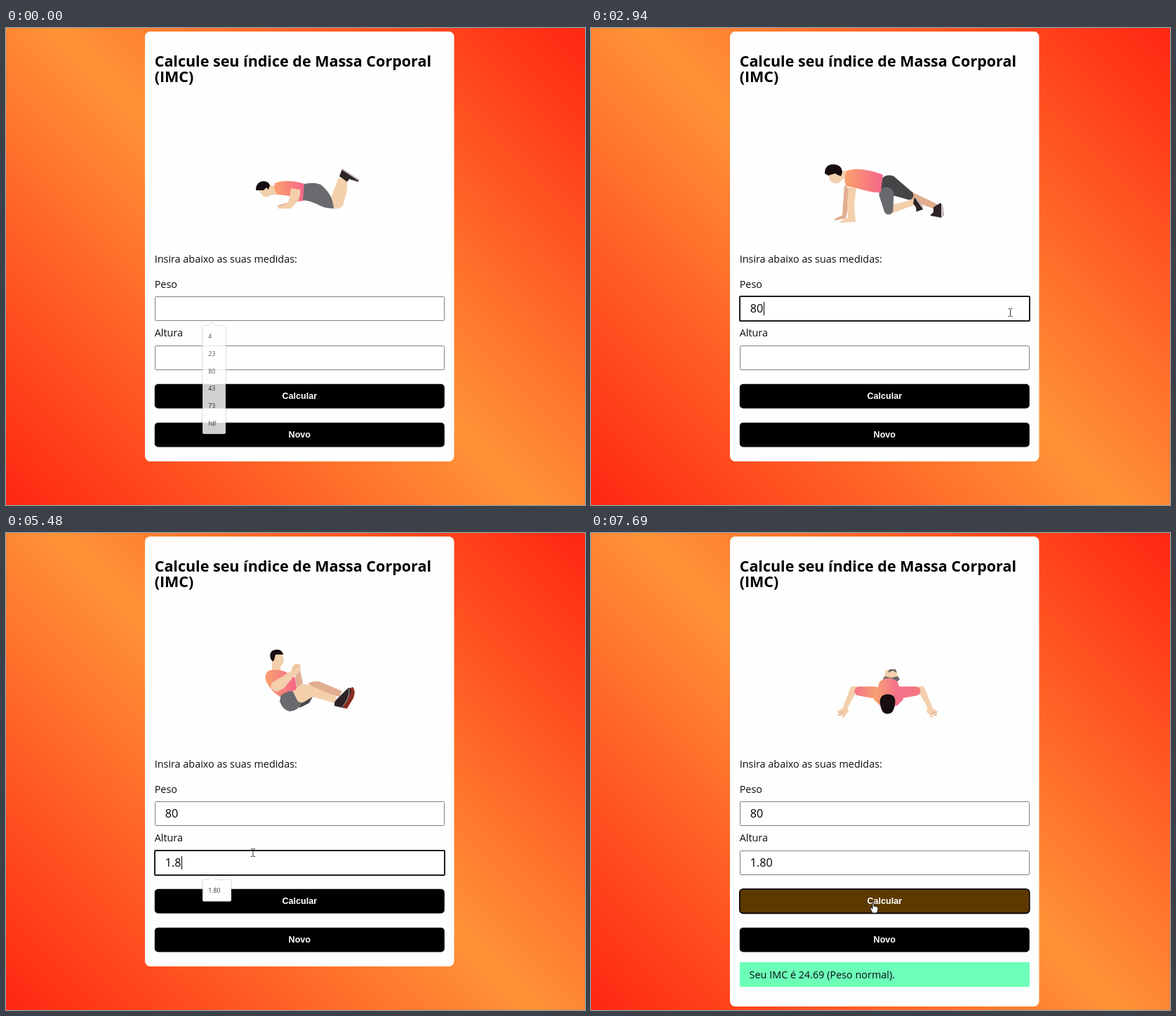
These frames come from a looping animation (825 by 679 pixels, 8000 ms). An HTML page:

```html
<!DOCTYPE html>
<html lang="pt">
<head>
<meta charset="utf-8">
<title>IMC</title>
<style>
html, body { margin: 0; width: 100%; height: 100%; overflow: hidden; }
body { background: linear-gradient(45deg, #ff2611, #ff9337, #ff2611); }
svg { display: block; width: 100%; height: 100%; }
text { font: 14.4px "Open Sans", sans-serif; fill: #0c0c14; }
.title { font-size: 21.5px; font-weight: 700; fill: #000; }
.value { font-size: 16.2px; fill: #000; }
.button { font: 700 12.6px "Liberation Sans", Arial, sans-serif; fill: #fff; text-anchor: middle; }
.item { font-size: 8.7px; fill: #333; }
.skin { fill: #f3cfac; } .shade { fill: #e2ae90; } .hair { fill: #170d10; }
.grey { fill: #696a6d; } .dark { fill: #454548; } .shoe { fill: #2c2426; }
.sole { fill: #8a2d20; } .shirt { fill: url(#shirt); } .front { fill: url(#front); }
.trim { fill: none; stroke: #bbb3b1; } .crease { fill: none; stroke: #c99474; stroke-width: .8; }
.pale { fill: #cfc6c4; }
</style>
</head>
<body>
<svg viewBox="0 0 825 679" preserveAspectRatio="none">
  <defs>
    <linearGradient id="shirt">
      <stop offset=".1" stop-color="#f99c70"/><stop offset=".45" stop-color="#f8857a"/><stop offset=".9" stop-color="#f66b88"/>
    </linearGradient>
    <linearGradient id="front" gradientUnits="userSpaceOnUse" x1="380" x2="465" y1="0" y2="0">
      <stop offset="0" stop-color="#f67683"/><stop offset=".3" stop-color="#f6a071"/>
      <stop offset=".65" stop-color="#f4718a"/><stop offset="1" stop-color="#f67680"/>
    </linearGradient>
  </defs>
  <rect id="card" x="198" y="5" width="440.5" height="612" rx="7.5" fill="#fefefe"/>
  <text class="title" x="211.7" y="55">Calcule seu índice de Massa Corporal</text>
  <text class="title" x="211.7" y="76.5">(IMC)</text>
  <text x="211.7" y="334">Insira abaixo as suas medidas:</text>
  <text x="211.7" y="370">Peso</text>
  <text x="211.7" y="439.4">Altura</text>

  <g id="knees">
    <path class="skin" d="M360 231L374 223 385 225 387 237 377 238Q370 243 366 239z"/>
    <path class="hair" d="M356 231Q356 219 367 218 374 218 376 224L374 230 371 227 367 231z"/>
    <path class="shade" d="M386 253L400 249 408 251 404 256 388 255z"/>
    <path class="shirt" d="M383 221C393 216 410 217 426 222L424 246 414 247 404 239 386 237Q381 229 383 221z"/>
    <path class="skin" d="M406 228L419 230Q420 240 415 247L406 257 387 257 389 254 401 250 404 242z"/>
    <path class="skin" d="M463 242L474 213 486 217C487 232 483 243 480 253Q474 259 464 257z"/>
    <path class="grey" d="M425 222C440 219 449 221 454 228 462 236 466 245 467 257L456 256C445 253 438 246 423 245z"/>
    <path class="shoe" d="M475 211L479 201 503 216 502 219 489 215 486 219z"/>
    <path class="trim" d="M479 201L503 217" stroke-width="2"/>
  </g>

  <g id="lying">
    <path class="hair" d="M349 214Q350 208 356 207L358 224 355 227Q350 227 348 219z"/>
    <path class="skin" d="M352 214L356 207 363 206 364 212 361 216 363 226 356 225 354 218z"/>
    <path class="sole" d="M350 215l4-2 1 5-4 2z"/>
    <path class="skin" d="M357 231L376 234 393 239 386 241 368 241Q360 239 357 231z"/>
    <path class="shirt" d="M357 214C370 205 387 205 399 212L394 236 383 236 376 232 362 236Q354 224 357 214z"/>
    <ellipse class="grey" cx="400" cy="226" rx="14" ry="14"/>
    <g id="raise">
      <path class="dark" d="M403 239L418 237 433 230 430 220 410 224z"/>
      <path class="shade" d="M424 226L447 219 465 219 464 223 448 225 431 227z"/>
      <path class="skin" d="M412 212L433 209 464 208 464 220 448 220 434 225 414 227z"/>
      <path class="grey" d="M389 216Q397 209 417 210L412 220 415 229 410 238Q398 242 388 235z"/>
      <g id="foot">
        <path class="shoe" d="M463 207L467 204 468 197 476 196 478 228 462 224z"/>
        <path class="sole" d="M475 197Q480 194 484 197 488 212 480 228L474 228Q478 212 475 197z"/>
        <path class="trim" d="M473 198Q478 212 472 227"/>
      </g>
    </g>
  </g>

  <g id="climber">
    <path class="shade" d="M361 224L369 230 366 256 363 271 347 274Q345 271 358 267z"/>
    <g id="legs"></g>
    <path class="skin" d="M338 209L347 204 365 203 367 211 358 216 352 221Q343 222 340 216z"/>
    <path class="hair" d="M333 207Q333 194 346 194 358 195 358 206L356 211 351 209 348 207 338 210z"/>
    <path class="shirt" d="M365 203C382 198 401 203 416 209L413 234C400 235 388 230 378 228L363 225Q359 212 365 203z"/>
    <path class="skin" d="M367 227L378 228 375 250 377 276 355 277Q353 275 366 270L365 250z"/>
  </g>

  <g id="crunch">
    <g id="shins">
      <path class="shade" d="M430 214Q440 209 448 212L479 225 475 233 446 226z"/>
      <path class="dark" d="M418 249L421 235 437 233 432 242z"/>
      <path class="sole" d="M485 224L494 219Q499 225 495 235L486 250 480 249z"/>
      <path class="shoe" d="M468 240L477 231 485 223 489 220 492 225 480 249 468 246z"/>
      <path class="trim" d="M489 222Q490 236 478 249"/>
      <path class="skin" d="M407 220Q422 211 436 218L471 233 468 242 437 233 424 241 414 243z"/>
    </g>
    <g id="torso">
      <path class="skin" d="M379 176L383 172 394 173 396 183 391 191 392 198 379 197z"/>
      <path class="hair" d="M377 179Q374 167 385 166 393 165 395 173L384 173 382 181 380 183z"/>
      <path class="shirt" d="M373 197Q380 192 397 197L412 206 414 222 393 235Q378 226 371 212 367 203 373 197z"/>
      <path class="shade" d="M412 203L419 195 423 214 414 220z"/>
      <path class="skin" d="M378 222Q375 214 384 210L407 196 408 190Q412 184 419 187L420 193Q416 201 410 204L396 221 386 226z"/>
      <path class="crease" d="M408 196Q412 190 418 188"/>
    </g>
    <path class="grey" d="M392 231Q403 223 409 226L416 240 422 242Q416 253 404 254 393 251 390 239z"/>
  </g>

  <g id="pushup"></g>

  <g id="fields"></g>
  <rect id="calc" x="211.8" y="506.8" width="413" height="34.6" rx="5"/>
  <rect x="211.8" y="561.8" width="413" height="34.6" rx="5"/>
  <text class="button" x="418.3" y="528.2">Calcular</text>
  <text class="button" x="418.3" y="583.2">Novo</text>
  <g id="result">
    <rect x="212" y="611" width="413" height="35" fill="#6cffb8"/>
    <text x="225.6" y="633.6">Seu IMC é 24.69 (Peso normal).</text>
  </g>
  <g id="popups"></g>

  <path id="ibeam" d="M-3 -5.5H-1.2L0 -4.5 1.2 -5.5H3M0 -4.5V4.5M-3 5.5H-1.2L0 4.5 1.2 5.5H3" fill="none" stroke="#333"/>
  <path id="arrow" d="M0 0V11.5L2.7 9 4.5 13 6.3 12.2 4.6 8.3H8z" fill="#fff" stroke="#222" stroke-width=".9"/>
  <path id="hand" d="M-2 -7Q0 -8 0 -6V-2L5 -1Q6.5 0 6 3L4.5 8H-2L-5 2Q-5.5 0 -3.5 0L-2 2z" fill="#fff" stroke="#111"/>
</svg>
<script>
const LOOP = 8000, BLINK = 530, FADE = 150;
const HOVER = 7080, SUBMIT = 7620;

const $ = id => document.getElementById(id);
const mix = (a, b, k) => a + (b - a) * k;
const mixAll = (a, b, k) => a.map((v, i) => mix(v, b[i], k));
const clamp = x => Math.min(1, Math.max(0, x));
const ramp = (t, start, length) => clamp((t - start) / length);
const smooth = x => x * x * (3 - 2 * x);
const show = (id, on) => { $(id).style.display = on ? '' : 'none'; };
const transform = (id, value) => $(id).setAttribute('transform', value);
const path = (d, cls, place = '') => `<path class="${cls}" d="${d}" transform="${place}"/>`;

// Tapered limb with round ends.
function limb(x1, y1, x2, y2, w1, w2, cls) {
  const len = Math.hypot(x2 - x1, y2 - y1), nx = (y1 - y2) / len / 2, ny = (x2 - x1) / len / 2;
  const a = side => `${x1 + nx * w1 * side} ${y1 + ny * w1 * side}`;
  const b = side => `${x2 + nx * w2 * side} ${y2 + ny * w2 * side}`;
  return path(`M${a(1)}L${b(1)}A${w2 / 2} ${w2 / 2} 0 0 0 ${b(-1)}L${a(-1)}A${w1 / 2} ${w1 / 2} 0 0 0 ${a(1)}z`, cls);
}

function drawLying(t) {
  const angle = -67 * ramp(t, 740, 430) * (1 - ramp(t, 1140, 1060) ** 2);
  transform('raise', `rotate(${angle} 404 222)`);
  transform('foot', `rotate(${-.25 * angle} 464 214)`);
}

// Joints: hip, knee, ankle.
const straight = [425, 223, 453, 238, 491, 254], bent = [421, 237, 424, 259, 460, 248];

function climberLeg(k, thigh, calf) {
  const [hx, hy, kx, ky, ax, ay] = mixAll(straight, bent, k);
  const foot = `translate(${ax} ${ay}) rotate(${-35 * k}) scale(${1 - .4 * k} 1)`;
  return limb(kx, ky, ax, ay, 12, 8, calf) +
    limb(hx, hy, kx, ky, mix(27, 21, k), 13, thigh) +
    path('M-3 1L7 -5 10 -1 12 12 8 16-8 13-3 8z', 'shoe', foot) +
    path('M8 -3L10 -1 12 12 8 16z', 'pale', foot);
}

function drawClimber(t) {
  const swap = Math.sin(Math.PI * (t - 3430) / 980) ** 2;
  $('legs').innerHTML = climberLeg(1 - swap, 'dark', 'shade') + climberLeg(swap, 'grey', 'skin');
}

function drawCrunch(t) {
  const lean = 6 * Math.cos(Math.PI / 2 * (t - 4885) / 595);
  transform('shins', `translate(${lean} 0)`);
  transform('torso', `rotate(${-.8 * lean} 405 243)`);
}

// Joints: shoulder, end of sleeve, elbow, wrist.
const armLow = [404, 227, 382, 225, 374, 223, 361, 251], armUp = [402, 199, 391, 219, 377, 235, 361, 251];

function pushupArm(u, side) {
  const [sx, sy, mx, my, ex, ey, wx, wy] =
    mixAll(armLow, armUp, u).map((v, i) => i % 2 || side > 0 ? v : 845 - v);
  const hand = `translate(${wx} ${wy}) scale(${side} 1)`;
  return limb(mx, my, ex, ey, 11, 10, 'skin') + limb(ex, ey, wx, wy, 10, 6, 'skin') +
    path('M-1 -3L-10 3-9 5-3 4-10 7-8 9-1 6-4 12-1 12 3 6 6 4 4 -4z', 'skin', hand) +
    path('M-9 5L-2 4M-8 9L0 6', 'crease', hand) +
    limb(sx, sy, mx, my, 17, 13, 'front');
}

function drawPushup(t) {
  const u = smooth(clamp((450 - Math.abs(t - 6985)) / 300));
  const top = mix(206, 183, u), neck = mix(13, 21, u), chest = mix(21, 31, u), x = mix(424, 422, u);
  const body = `M${x - neck} ${top + 6}Q${x} ${top - 5} ${x + neck} ${top + 6}L${x + chest} ${mix(237, 209, u)}` +
    `L${x + 12} ${mix(246, 213, u)}H${x - 12}L${x - chest} ${mix(237, 211, u)}z`;
  const feet = path('M417 207L420 195 434 195 439 207z', 'skin') +
    path('M423 199l2-5h9l2 5-6-3zM416 207l3-3 9 2 9-2 3 4-3 3h-19z', 'grey');
  $('pushup').innerHTML = (u < .6 ? feet : '') + pushupArm(u, 1) + pushupArm(u, -1) + path(body, 'front') +
    path('M-11 -4Q-10 -14 0 -14 11 -14 11 -3 10 8 6 12Q0 16-6 12-10 7-11 -4z', 'hair',
      `translate(${mix(422.5, 421, u)} ${mix(243.5, 201.5, u)})`);
}

const figures = [
  { id: 'knees', start: 0 },
  { id: 'lying', start: 270, draw: drawLying },
  { id: 'climber', start: 2600, draw: drawClimber },
  { id: 'crunch', start: 3760, draw: drawCrunch },
  { id: 'pushup', start: 6000, draw: drawPushup },
];

const inputs = [
  { y: 382, focus: 880, blur: 3760, text: '80', firstKey: 2200, gap: 260, history: ['4', '23', '80', '43', '73', 'fdf', '89'] },
  { y: 452, focus: 3760, blur: SUBMIT, text: '1.80', firstKey: 4550, gap: 377, history: ['1.80', '1.75', '4', '23', '80', '73'] },
];

function stateOf(input, t) {
  const count = Math.min(input.text.length, Math.max(0, Math.floor((t - input.firstKey) / input.gap) + 1));
  return {
    value: input.text.slice(0, count),
    focused: t >= input.focus && t < input.blur,
    lastKey: count ? input.firstKey + (count - 1) * input.gap : input.focus,
  };
}

function fieldMarkup(input, t) {
  const { value, focused, lastKey } = stateOf(input, t), y = input.y;
  const width = [...value].reduce((w, c) => w + 16.2 * (c === '.' ? .266 : .571), 0);
  const frame = focused
    ? `<rect x="212" y="${y}" width="413" height="35" rx="1" fill="#fff" stroke="#1c1c1c" stroke-width="2"/>`
    : `<rect x="212.5" y="${y + .5}" width="412" height="34" rx="1" fill="#fff" stroke="#808080"/>`;
  const caretOn = focused && Math.floor((t - lastKey) / BLINK) % 2 === 0;
  return frame + `<text class="value" x="226.8" y="${y + 22.8}">${value}</text>` +
    (caretOn ? `<path d="M${Math.round(227 + width) + .5} ${y + 8}v19" stroke="#000"/>` : '');
}

const matches = (input, prefix) =>
  input.history.filter(s => s.startsWith(prefix) && s !== prefix).slice(0, 6);

function popupMarkup(input, t) {
  const { value, focused, lastKey } = stateOf(input, t);
  let items = matches(input, value), opacity = ramp(t, input.focus - 40, FADE);
  if (!items.length) {
    items = matches(input, value.slice(0, -1));
    opacity = 1 - ramp(t, lastKey - 40, FADE);
  }
  if (!focused) opacity = input === inputs[0] ? .82 * (1 - ramp(t, 0, 200)) : 0;
  if (!opacity) return '';

  const top = input.y + 41.5, height = 6.2 + items.length * 24.7;
  const right = 280 + Math.max(33, ...items.map(s => 9 + 8 * s.length));
  const box = `M282 ${top}H288L294 ${top - 5}L300 ${top}H${right - 2}q2 0 2 2v${height - 4}q0 2-2 2H282q-2 0-2-2v${4 - height}q0-2 2-2z`;
  return `<g opacity="${opacity}"><path d="${box}" fill="#fff" stroke="#000" stroke-opacity=".1" style="filter:drop-shadow(0 1px 1px #0003)"/>` +
    items.map((s, i) => `<text class="item" x="288.3" y="${top + 18.7 + i * 24.7}">${s}</text>`).join('') + '</g>';
}

const moves = [
  { start: 70, end: 410, from: [720, 590], to: [598, 405] },
  { start: 2940, end: 3430, from: [598, 405], to: [347, 447] },
  { start: 3430, end: 3560, from: [347, 447], to: [352, 455] },
  { start: 6960, end: 7020, from: [352, 455], to: [380, 494] },
  { start: 7020, end: HOVER, from: [380, 494], to: [403, 533] },
];

function drawPointer(t) {
  const move = moves.findLast(m => t >= m.start) || moves[0];
  const [x, y] = mixAll(move.from, move.to, ramp(t, move.start, move.end - move.start));
  const overInput = x < 626 && inputs.some(input => y > input.y - 2 && y < input.y + 43 && !(y > 417 && y < 450));
  const kind = t >= HOVER ? 'hand' : overInput ? 'ibeam' : 'arrow';
  for (const id of ['ibeam', 'arrow', 'hand']) {
    show(id, id === kind && t >= moves[0].start);
    transform(id, `translate(${x} ${y})`);
  }
}

function draw(t) {
  const figure = figures.findLast(f => t >= f.start);
  for (const f of figures) show(f.id, f === figure);
  if (figure.draw) figure.draw(t);

  $('fields').innerHTML = inputs.map(input => fieldMarkup(input, t)).join('');
  $('popups').innerHTML = inputs.map(input => popupMarkup(input, t)).join('');
  $('calc').setAttribute('style', t >= HOVER ? 'fill:#5d3900;stroke:#000;stroke-width:1.6' : '');
  $('card').setAttribute('height', t >= SUBMIT ? 669 : 612);
  show('result', t >= SUBMIT);
  drawPointer(t);
}

const begin = performance.now();
function tick() {
  draw((performance.now() - begin) % LOOP);
  requestAnimationFrame(tick);
}
tick();
</script>
</body>
</html>
```
